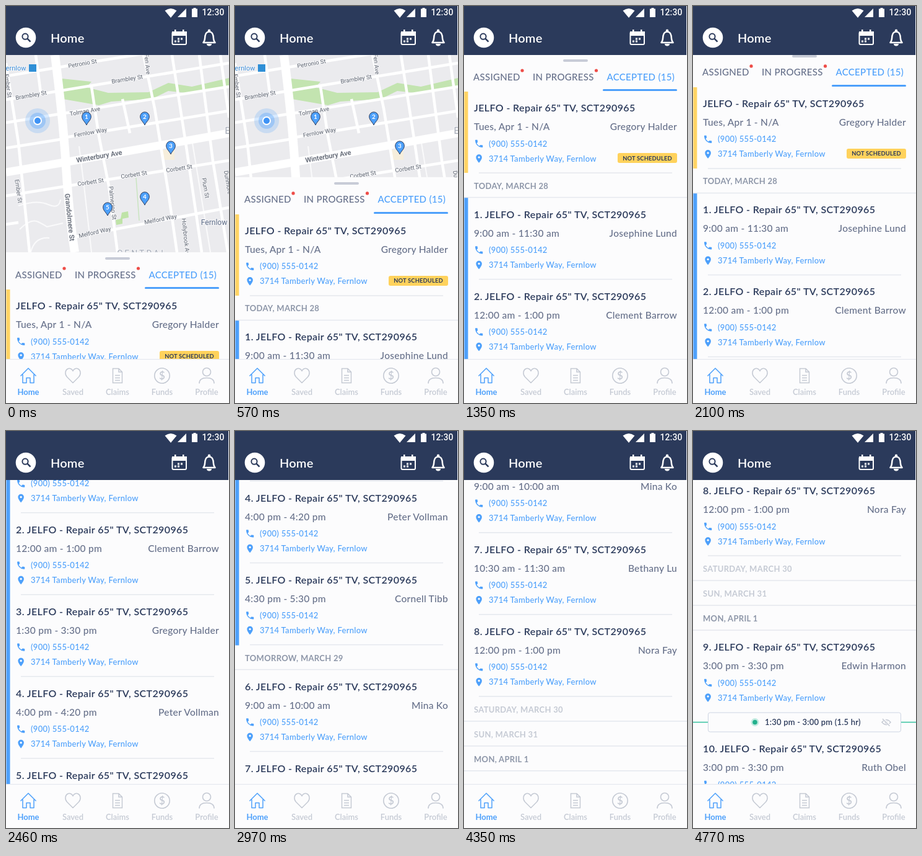
Animation, 360 px wide and 640 px high, one loop 5.1 s. Source, as an HTML page:

```html
<!DOCTYPE html>
<html lang="en">
<head>
<meta charset="utf-8">
<title>Job list</title>
<style>
html, body { margin: 0; width: 100%; height: 100%; overflow: hidden; background: #fcfcfd; }
svg { display: block; width: 360px; height: 640px; }
text { font-family: Lato, sans-serif; white-space: pre; }
.map text, .clock { font-family: Roboto, sans-serif; }
.map text { font-size: 9.5px; fill: #5f6672; text-anchor: middle; stroke: #f6f6f8; stroke-width: 2px; paint-order: stroke; }
.map .big { font-size: 11px; font-weight: 500; }
.map .area { font-size: 14px; letter-spacing: 3px; fill: #a5abb7; }
.map .city { font-size: 12px; fill: #5c6b86; }
.map .stop { font-size: 11px; fill: #3f8fd8; }
.map .num { font: 700 10px Lato, sans-serif; fill: #fff; stroke: none; }
.title { font-size: 16px; font-weight: 600; letter-spacing: .38px; fill: #2b3a5b; }
.sub { font-size: 15.5px; font-weight: 500; letter-spacing: .27px; fill: #66708a; }
.link { font-size: 13px; letter-spacing: .3px; font-weight: 500; fill: #4da0fb; }
.day { font-size: 13px; font-weight: 700; letter-spacing: .3px; fill: #8d96a8; }
.dim { fill: #c5cad4; }
.tab { font-size: 15px; font-weight: 500; letter-spacing: .3px; fill: #66708a; }
.on { fill: #4da0fb; }
.badge { font-size: 9.4px; font-weight: 700; letter-spacing: .15px; fill: #2b3a5b; }
.slot { font-size: 13px; font-weight: 600; letter-spacing: .2px; fill: #2b3a5b; }
.nav { font-size: 13px; font-weight: 600; text-anchor: middle; fill: #c5cad4; }
.nav.on { font-weight: 700; fill: #4da0fb; }
.end { text-anchor: end; }
.mid { text-anchor: middle; }
</style>
</head>
<body>
<svg id="stage" viewBox="0 0 360 640" xmlns="http://www.w3.org/2000/svg"></svg>
<script>
const LOOP = 5100, STEP = 30;
const NAVY = '#2b3a5b', BLUE = '#4da0fb', GREY = '#c5cad4', LINE = '#e5e8ee';

const text = (cls, x, y, s, more = '') => `<text class="${cls}" x="${x}" y="${y}" ${more}>${s}</text>`;
const rect = (x, y, w, h, fill, more = '') => `<rect x="${x}" y="${y}" width="${w}" height="${h}" fill="${fill}" ${more}/>`;
const circle = (x, y, r, fill, more = '') => `<circle cx="${x}" cy="${y}" r="${r}" fill="${fill}" ${more}/>`;
const fill = (d, c, more = '') => `<path d="${d}" fill="${c}" ${more}/>`;
const line = (d, c, w, more = '') => `<path d="${d}" fill="none" stroke="${c}" stroke-width="${w}" ${more}/>`;
const rule = (y, x = 0, w = 360) => rect(x, y, w, 1.5, LINE);

// ---- map ----
function map() {
  const minor = [
    'M0 113L90 98L360 55', 'M0 151L360 92', 'M0 188L360 130', 'M95 212L360 169',
    'M0 306L100 290L360 249', 'M0 352L20 349', 'M107 373L360 325', 'M0 229L88 215',
    'M138 130L150 210L166 290L180 397', 'M222 79L240 165L262 300L276 397',
    'M0 92L20 220L38 397', 'M268 79L290 220L316 397', 'M312 79L334 250L358 397',
    'M188 150L200 205', 'M346 79L360 180', 'M48 79L56 140'
  ];
  const thin = ['M20 322Q50 312 68 320T88 312', 'M22 360Q40 342 52 348T66 356L92 350', 'M40 397Q46 372 70 374',
    'M118 226L126 290L138 397', 'M300 215L330 397'];
  const labels = [
    ['', 124, 96, -10, 'Petronio St'], ['', 41, 147, -10, 'Brambley St'], ['', 196, 121, -9, 'Brambley St'],
    ['', 128, 173, -10, 'Tolman Ave'], ['', 137, 207, -10, 'Fernlow Way'], ['big', 151, 246, -10, 'Winterbury Ave'],
    ['', 137, 287, -9, 'Corbett St'], ['', 207, 275, -9, 'Corbett St'], ['', 280, 265, -9, 'Corbett St'],
    ['', 144, 368, -13, 'Melford Way'], ['', 250, 347, -11, 'Melford Way'],
    ['big', 99, 341, 84, 'Grandolmere St'], ['', 169, 318, 84, 'Palmerino St'], ['', 17, 299, 82, 'Ember St'],
    ['', 0, 129, 82, 'Ember St'], ['', 319, 294, 80, 'Plum St'], ['', 287, 374, 84, 'Hollybrook Ave'],
    ['', 225, 94, 84, 'Fen Ave'], ['', 355, 285, 80, 'Dunmore']
  ];
  const pins = [[130, 179], [224, 179], [266, 226], [224, 308], [164, 325]];
  let s = rect(0, 79, 360, 319, '#ebebee');
  s += rect(253, 232, 19, 16, '#f6eedc');
  s += fill('M90 117L138 122L130 131L165 140L230 139L262 124L300 130L360 116V128L300 141L262 137L235 150L170 154L150 160L92 150Z', '#c3e4b0');
  s += fill('M177 345L185 343L187 333L197 331L198 341L188 343V351L178 353Z', '#bfe3a8');
  s += thin.map(d => line(d, '#fafafb', 2)).join('');
  s += minor.map(d => line(d, '#fff', 4.5)).join('');
  s += line('M210 277L215 346', '#c9e4c0', 1.5);
  s += line('M0 268L100 251L360 205', '#fff', 13);
  s += line('M79 79Q92 180 97 260T111 397', '#fff', 14);
  s += labels.map(([c, x, y, a, t]) => text(c, x, y, t, `transform="rotate(${a} ${x} ${y})"`)).join('');
  s += text('stop', 16, 104, 'ernlow') + rect(37, 94, 12, 12, '#2f8fd6');
  s += text('city', 336, 353, 'Fernlow') + text('area', 359, 206, 'E') + text('area', 220, 404, 'CENTRAL');
  s += circle(51, 185, 20, BLUE, 'opacity=".22"') + circle(51, 185, 13, BLUE, 'opacity=".35"');
  s += circle(51, 185, 7, '#fff') + circle(51, 185, 5, '#3f93f5');
  pins.forEach(([x, y], i) => {
    s += `<g transform="translate(${x} ${y})">`
      + fill('M0 13C-2 8-7.3 5-7.3-.8A7.3 7.3 0 0 1 7.3-.8C7.3 5 2 8 0 13Z', BLUE, `stroke="${NAVY}" stroke-width="1"`)
      + text('num', 0, 3, i + 1) + '</g>';
  });
  return `<g class="map">${s}</g>`;
}

// ---- scrolling sheet ----
const PHONE = 'M6.62 10.79c1.44 2.83 3.76 5.14 6.59 6.59l2.2-2.2c.27-.27.67-.36 1.02-.24 1.12.37 2.33.57 3.57.57.55 0 1 .45 1 1V20c0 .55-.45 1-1 1-9.39 0-17-7.61-17-17 0-.55.45-1 1-1h3.5c.55 0 1 .45 1 1 0 1.25.2 2.45.57 3.57.11.35.03.74-.25 1.02z';
const PLACE = 'M12 2C8.13 2 5 5.13 5 9c0 5.25 7 13 7 13s7-7.75 7-13c0-3.87-3.13-7-7-7zm0 9.5a2.5 2.5 0 0 1 0-5 2.5 2.5 0 0 1 0 5z';
const glyph = (d, y) => fill(d, BLUE, `transform="translate(16 ${y - 8.2}) scale(.68)"`);

function job(y, num, time, who) {
  return text('title', 16, y + 6, `${num}JELFO - Repair 65" TV, SCT290965`)
    + text('sub', 16, y + 36, time) + text('sub end', 344, y + 36, who)
    + glyph(PHONE, y + 58) + text('link', 40, y + 62.5, '(900) 555-0142')
    + glyph(PLACE, y + 82) + text('link', 40, y + 86.5, '3714 Tamberly Way, Fernlow');
}

function slot(y) {
  const eye = line('M-7 0Q0-8 7 0Q0 8-7 0Z', GREY, 1.6) + circle(0, 0, 2.4, GREY)
    + line('M-5.5-6L6 6', '#fcfcfd', 3.4) + line('M-6-5.5L5.5 6', GREY, 1.5);
  return rect(0, y + 15.2, 360, 1.6, '#3cc4a2')
    + rect(24.5, y + .5, 311, 31, '#fcfcfd', 'rx="3" stroke="#cdd5e3"')
    + circle(100, y + 16, 6.5, '#3cc4a2', 'opacity=".3"') + circle(100, y + 16, 3.8, '#22b08c')
    + text('slot', 116, y + 20.7, '1:30 pm - 3:00 pm (1.5 hr)')
    + `<g transform="translate(312 ${y + 16})">${eye}</g>`;
}

function sheet() {
  const rows = [
    ['9:00 am - 11:30 am', 'Josephine Lund'], ['12:00 am - 1:00 pm', 'Clement Barrow'],
    ['1:30 pm - 3:30 pm', 'Gregory Halder'], ['4:00 pm - 4:20 pm', 'Peter Vollman'],
    ['4:30 pm - 5:30 pm', 'Cornell Tibb'], ['9:00 am - 10:00 am', 'Mina Ko'],
    ['10:30 am - 11:30 am', 'Bethany Lu'], ['12:00 pm - 1:00 pm', 'Nora Fay'],
    ['3:00 pm - 3:30 pm', 'Edwin Harmon'], ['3:00 pm - 3:30 pm', 'Ruth Obel']
  ];
  const days = {
    0: ['TODAY, MARCH 28'], 5: ['TOMORROW, MARCH 29'],
    8: ['SATURDAY, MARCH 30', 'SUN, MARCH 31', 'MON, APRIL 1']
  };
  let s = rect(0, 397, 360, 2000, '#fcfcfd') + rect(160, 405, 40, 4, '#c8ccd7', 'rx="2"');
  s += text('tab', 15, 438.5, 'ASSIGNED') + text('tab', 111, 438.5, 'IN PROGRESS') + text('tab on', 230.5, 438.5, 'ACCEPTED (15)');
  s += circle(94, 423, 2.6, '#ee4d48') + circle(213.5, 423, 2.6, '#ee4d48');
  s += rect(224, 453, 120, 3, BLUE, 'rx="1.5"');
  s += rect(.5, 457, 6, 131, '#ffd463') + rect(.5, 628, 6, 660.5, BLUE);
  s += job(483, '', 'Tues, Apr 1 - N/A', 'Gregory Halder');
  s += rect(248, 556, 96, 16, '#ffd25c', 'rx="3"') + text('badge mid', 296, 567.5, 'NOT SCHEDULED');
  let y = 483;
  rows.forEach(([time, who], i) => {
    if (i === 9) {
      s += slot(y + 105.5);
      y += 164;
    } else {
      s += rule(y + 104.3, 24, 312);
      y += i ? 132 : 131.5;
    }
    (days[i] || []).forEach((d, k, all) => {
      s += text('day' + (k < all.length - 1 ? ' dim' : ''), 16, y - 1, d) + rule(y + 12.3);
      y += 40;
    });
    s += job(y, `${i + 1}. `, time, who);
  });
  return `<g id="sheet">${s}</g>`;
}

// ---- fixed bars ----
function header() {
  let s = rect(0, 0, 360, 79, '#fcfcfd') + rect(0, 0, 359, 79, NAVY);
  s += fill('M256.5 7.5Q266 .5 275.5 7.5L266 19Z', '#fff') + fill('M291 4V18H277Z', '#fff');
  s += fill('M302.5 3H306.5V4.5H309V18H300V4.5H302.5Z', '#fff');
  s += text('clock', 316.5, 15, '12:30', 'font-size="13.8" font-weight="500" fill="#fff" letter-spacing=".2"');
  s += circle(32, 51, 16.3, '#fff') + circle(31, 49.2, 4.6, 'none', `stroke="${NAVY}" stroke-width="2"`);
  s += line('M34.5 52.7L39.5 57.7', NAVY, 2.4);
  s += text('', 72, 58.5, 'Home', 'font-size="20" font-weight="600" fill="#fff" letter-spacing=".2"');
  s += rect(268.5, 42, 22.5, 20, 'none', 'rx="2" stroke="#fff" stroke-width="2"') + rect(268, 41, 24, 7, '#fff');
  s += rect(272, 38, 2.5, 5, '#fff') + rect(285, 38, 2.5, 5, '#fff');
  for (const [x, y] of [[277, 51.5], [282, 51.5], [272, 55.5], [277, 55.5]]) s += rect(x, y, 3, 3, '#fff');
  s += line('M318.5 59C321.5 56 321 51 321.5 48C322.5 43 325 41.5 328 41.5S333.5 43 334.5 48C335 51 334.5 56 337.5 59Z', '#fff', 2.5, 'stroke-linejoin="round"');
  s += circle(328, 39.8, 2.2, '#fff') + fill('M324 61H332A4 3.4 0 0 1 324 61Z', '#fff');
  return s;
}

function nav() {
  const icons = [
    line('M23.5 596.5L36 584L48.5 596.5M27 594V607.5H33V599.5H39V607.5H45V594', BLUE, 1.5, 'stroke-linejoin="round"'),
    line('M108 607.5L98.5 598C94.5 593.5 95.5 587 99.5 585C103 583.3 106.5 585 108 588.5C109.5 585 113 583.3 116.5 585C120.5 587 121.5 593.5 117.5 598Z', GREY, 1.5, 'stroke-linejoin="round"'),
    line('M172.5 584.5H182L187.5 590V607.5H172.5ZM182 584.5V590H187.5M176 595.5H184M176 599.5H184M176 603.5H184', GREY, 1.5),
    circle(252, 596, 12.2, 'none', `stroke="${GREY}" stroke-width="1.6"`) + text('mid', 252, 602, '$', `font-size="17" font-weight="600" fill="${GREY}"`),
    circle(324, 590, 6.5, 'none', `stroke="${GREY}" stroke-width="1.6"`) + line('M312 608.5C312 602 316 599.5 324 599.5S336 602 336 608.5', GREY, 1.6)
  ];
  return rect(0, 570, 360, 70, '#fcfcfd') + rect(0, 569, 360, 1.2, LINE)
    + ['Home', 'Saved', 'Claims', 'Funds', 'Profile'].map((t, i) =>
      icons[i] + text(i ? 'nav' : 'nav on', 36 + 72 * i, 626.5, t)).join('');
}

document.getElementById('stage').innerHTML = map() + sheet() + header() + nav();
const list = document.getElementById('sheet');

// ---- motion ----
function easeInOut(x) {
  let lo = 0, hi = 1;
  for (let i = 0; i < 24; i++) {
    const s = (lo + hi) / 2, r = 1 - s;
    if (1.26 * s * r * r + 1.74 * s * s * r + s ** 3 < x) lo = s; else hi = s;
  }
  return lo * lo * (3 - 2 * lo);
}

// Each swipe eases from its start but shows only once the finger has caught.
const GLIDE = 855;
const swipes = [
  { start: 203, shown: 240, dist: 319 },
  { start: 2035, shown: 2100, dist: 624 },
  { start: 3868, shown: 3930, dist: 579.5 }
];

function scrollAt(t) {
  return swipes.reduce((sum, { start, shown, dist }) =>
    t < shown ? sum : sum + dist * easeInOut(Math.min(1, (t - start) / GLIDE)), 0);
}

function draw(now) {
  const t = Math.floor((now % LOOP) / STEP) * STEP;
  list.setAttribute('transform', `translate(0 ${-scrollAt(t).toFixed(2)})`);
  requestAnimationFrame(draw);
}
draw(performance.now());
</script>
</body>
</html>
```
